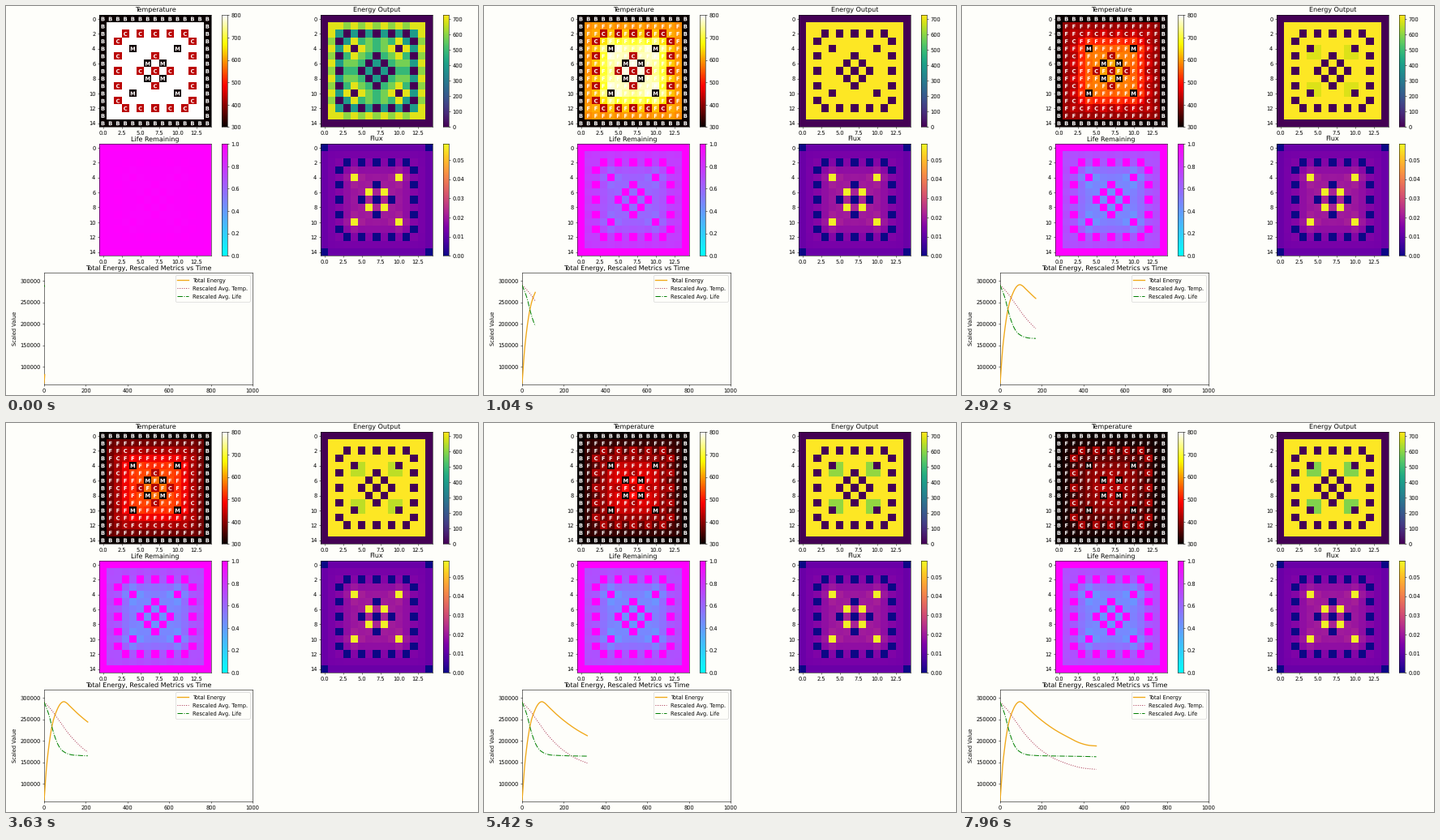
These frames come from a looping animation (582 by 480 pixels, 8 s). A matplotlib script:

```python
import numpy as np
import matplotlib.pyplot as plt
from matplotlib.animation import FuncAnimation
from matplotlib.patches import PathPatch
from matplotlib.path import Path
from matplotlib.textpath import TextPath
from matplotlib.transforms import Affine2D

W, H, DPI = 582, 480, 48
N, CELL = 15, 9.2
FRAMES, INTERVAL = 200, 40
BG = "#fefefa"
plt.rcParams.update({
    "font.family": "DejaVu Sans",
    "text.hinting": "none",
    "figure.facecolor": BG,
    "axes.facecolor": BG,
})
fig = plt.figure(figsize=(W / DPI, H / DPI), dpi=DPI)


def px_axes(x, y, w, h):
    """Axes placed in pixels from the top left corner."""
    return fig.add_axes([x / W, 1 - (y + h) / H, w / W, h / H])


# --- core layout: B border, C control rods, M moderators, F fuel ---
kind = np.full((N, N), "F")
kind[[0, -1], :] = "B"
kind[:, [0, -1]] = "B"
rods = {2: (3, 5, 7, 9, 11), 3: (2, 12), 5: (2, 7, 12), 7: (2, 5, 7, 9, 12)}
for row, cols in rods.items():
    for col in cols:
        kind[row, col] = kind[N - 1 - row, col] = "C"
outer_mod = np.zeros((N, N), bool)
outer_mod[np.ix_([4, 10], [4, 10])] = True
kind[outer_mod] = "M"
kind[np.ix_([6, 8], [6, 8])] = "M"
fuel = kind == "F"


def neighbours(mask):
    m = np.pad(mask.astype(int), 1)
    return m[:-2, 1:-1] + m[2:, 1:-1] + m[1:-1, :-2] + m[1:-1, 2:]


near_rod = neighbours(kind == "C")
near_mod = np.minimum(neighbours(outer_mod), 1)

# depth of each cell below the border, rounded off towards the corners
fold = np.minimum(np.arange(N), N - 1 - np.arange(N))
edge = fold + 1e-6
depth = (edge[:, None] ** -3.0 + edge[None, :] ** -3.0) ** (-1 / 3)
depth = np.minimum(depth, 5.3)

# fuel next to the outer moderators that burns out early
fr, fc = np.meshgrid(fold, fold, indexing="ij")
worn = ((fr == 4) & (fc == 5)) | ((fr == 5) & (fc == 4)) | ((fr == 5) & (fc == 5))


# --- curves over simulation time ---
def curve(points):
    """Smooth function through a few points (cubic Hermite)."""
    px, py = np.array(points, float).T
    slope = np.gradient(py, px)

    def f(x):
        x = np.asarray(x, float)
        i = np.clip(np.searchsorted(px, x, side="right") - 1, 0, len(px) - 2)
        h = px[i + 1] - px[i]
        t = (x - px[i]) / h
        return ((1 + 2 * t) * (1 - t) ** 2 * py[i] + t * (1 - t) ** 2 * h * slope[i]
                + t * t * (3 - 2 * t) * py[i + 1] - t * t * (1 - t) * h * slope[i + 1])
    return f


total = curve([(0, 62), (3, 82), (10, 130), (20, 177), (35, 227), (62, 272),
               (80, 287), (94, 291), (108, 288), (123, 281), (171, 259),
               (255, 228), (320, 210), (383, 195), (420, 190), (465, 188)])
avg_temp = curve([(0, 290), (30, 275), (62, 254), (123, 213.5), (171, 189),
                  (255, 160), (320, 147), (383, 138), (465, 133.5)])
avg_life = curve([(0, 290), (25, 257), (40, 228), (62, 196), (80, 181),
                  (100, 173), (123, 168.5), (171, 166), (255, 164.8),
                  (383, 164), (465, 163)])


# --- cell fields ---
def temperature(x):
    u = (depth - 1) / 4
    heat = (532 + 76 * u) * np.exp(-x / (105 + 77 * u)) + 8 + 82 * u
    heat = heat * (1 - 0.04 * near_rod + 0.09 * near_mod)
    t = np.where(fuel, 300 + heat, 300)
    t[kind == "C"] = 432 - 0.03 * x
    t[kind == "M"] = 304
    return t


def energy(x):
    start = 0.79 - 0.12 * near_rod + 0.17 * near_mod + 0.16 * (depth < 1.01)
    e = np.minimum(start * total(x) / total(3), 1)
    wear = 0.15 * np.clip((x - 130) / 120, 0, 1) + 0.04 * np.clip((x - 250) / 200, 0, 1)
    e = np.where(worn, e - wear, e)
    return np.where(fuel, e, 0) * 726


def life(x):
    loss = 0.25 + 0.072 * depth + 0.08 * near_mod - 0.02 * near_rod
    return np.where(fuel, 1 - loss * (290 - avg_life(x)) / 127, 1)


def flux():
    f = 0.2 + 0.035 * depth + 0.04 * near_mod
    f[kind == "C"] = 0
    f[kind == "M"] = 0.98
    f[np.ix_([0, -1], [0, -1])] = 0
    return f * 0.0584


# --- panels ---
def panel(x, y, title, data, cmap, lo, hi, ticks):
    ax = px_axes(x, y, N * CELL, N * CELL)
    im = ax.imshow(data, cmap=cmap, vmin=lo, vmax=hi, aspect="auto",
                   interpolation="nearest")
    ax.set_title(title, y=1)
    ax.set_xticks(np.arange(0, 13, 2.5))
    ax.set_yticks(np.arange(0, N, 2))
    bar = px_axes(x + 151, y, 7, N * CELL)
    bar.imshow(np.linspace(hi, lo, 256)[:, None], cmap=cmap, aspect="auto",
               extent=(0, 1, lo, hi))
    bar.xaxis.set_visible(False)
    bar.yaxis.tick_right()
    bar.set_yticks(ticks)
    return ax, im


X0 = 3
ax_t, im_t = panel(115, 11.4, "Temperature", temperature(X0), "hot",
                   300, 800, np.arange(300, 801, 100))
ax_e, im_e = panel(388, 11.4, "Energy Output", energy(X0), "viridis",
                   0, 726, np.arange(0, 701, 100))
ax_l, im_l = panel(115, 170.2, "Life Remaining", life(X0), "cool",
                   0, 1, np.linspace(0, 1, 6))
panel(388, 170.2, "Flux", flux(), "plasma", 0, 0.0584, np.arange(6) / 100)


def letter(ch):
    """Glyph outline centred on the origin, in cell units, y down."""
    size = 10 * DPI / 72 / CELL
    p = TextPath((0, 0), ch, size=100, prop={"family": "DejaVu Sans", "weight": "bold"})
    box = p.get_extents()
    shift = Affine2D().translate(-(box.x0 + box.x1) / 2, -(box.y0 + box.y1) / 2)
    return p.transformed(shift.scale(size / 100, -size / 100))


glyphs = {ch: letter(ch) for ch in "BCMF"}
labels = [glyphs[kind[r, c]].transformed(Affine2D().translate(c, r))
          for r in range(N) for c in range(N)]
verts = np.concatenate([p.vertices for p in labels])
codes = np.concatenate([p.codes for p in labels])
letters = PathPatch(Path(verts, codes), fc="white", lw=0, snap=False)
ax_t.add_patch(letters)
ax_t.set(xlim=(-0.5, N - 0.5), ylim=(N - 0.5, -0.5))

# --- time chart ---
chart = px_axes(47, 329, 257, 138)
chart.set_title("Total Energy, Rescaled Metrics vs Time", y=1)
chart.set_ylabel("Scaled Value")
chart.set(xlim=(0, 1000), ylim=(59100, 319000))
chart.set_xticks(np.arange(0, 1001, 200))
chart.set_yticks(np.arange(100000, 300001, 50000))
series = [
    (total, chart.plot([], [], color="#f0a818", lw=2, label="Total Energy")[0]),
    (avg_temp, chart.plot([], [], ":", color="#a8324e", label="Rescaled Avg. Temp.")[0]),
    (avg_life, chart.plot([], [], "-.", color="green", label="Rescaled Avg. Life")[0]),
]
legend = chart.legend(loc="upper right")

# --- draw everything that never changes once, and keep it as a backdrop ---
live = [ax_t, ax_e, ax_l]
moving = [im_t, im_e, im_l, letters] + [s for a in live for s in a.spines.values()]
for artist in moving:
    artist.set_visible(False)
fig.canvas.draw()
backdrop = np.array(fig.canvas.buffer_rgba())
for artist in moving:
    artist.set_visible(True)
legend.remove()
chart.spines[:].set_visible(False)
for a in list(fig.axes):
    if a not in live + [chart]:
        a.remove()
        continue
    a.set_title("", y=1)
    a.xaxis.set_visible(False)
    a.yaxis.set_visible(False)
    a.patch.set_visible(False)
fig.figimage(backdrop, zorder=-1)


def update(i):
    step = int((i * INTERVAL + 5) * 24 / 1000)
    x = X0 + 2.4 * step
    im_t.set_data(temperature(x))
    im_e.set_data(energy(x))
    im_l.set_data(life(x))
    xs = np.linspace(0, x, 4 + step)
    for f, line in series:
        line.set_data(xs, f(xs) * 1000)
    return [im_t, im_e, im_l] + [line for _, line in series]


anim = FuncAnimation(fig, update, frames=FRAMES, interval=INTERVAL,
                     init_func=lambda: update(0), repeat=True, repeat_delay=0)
plt.show()
```
